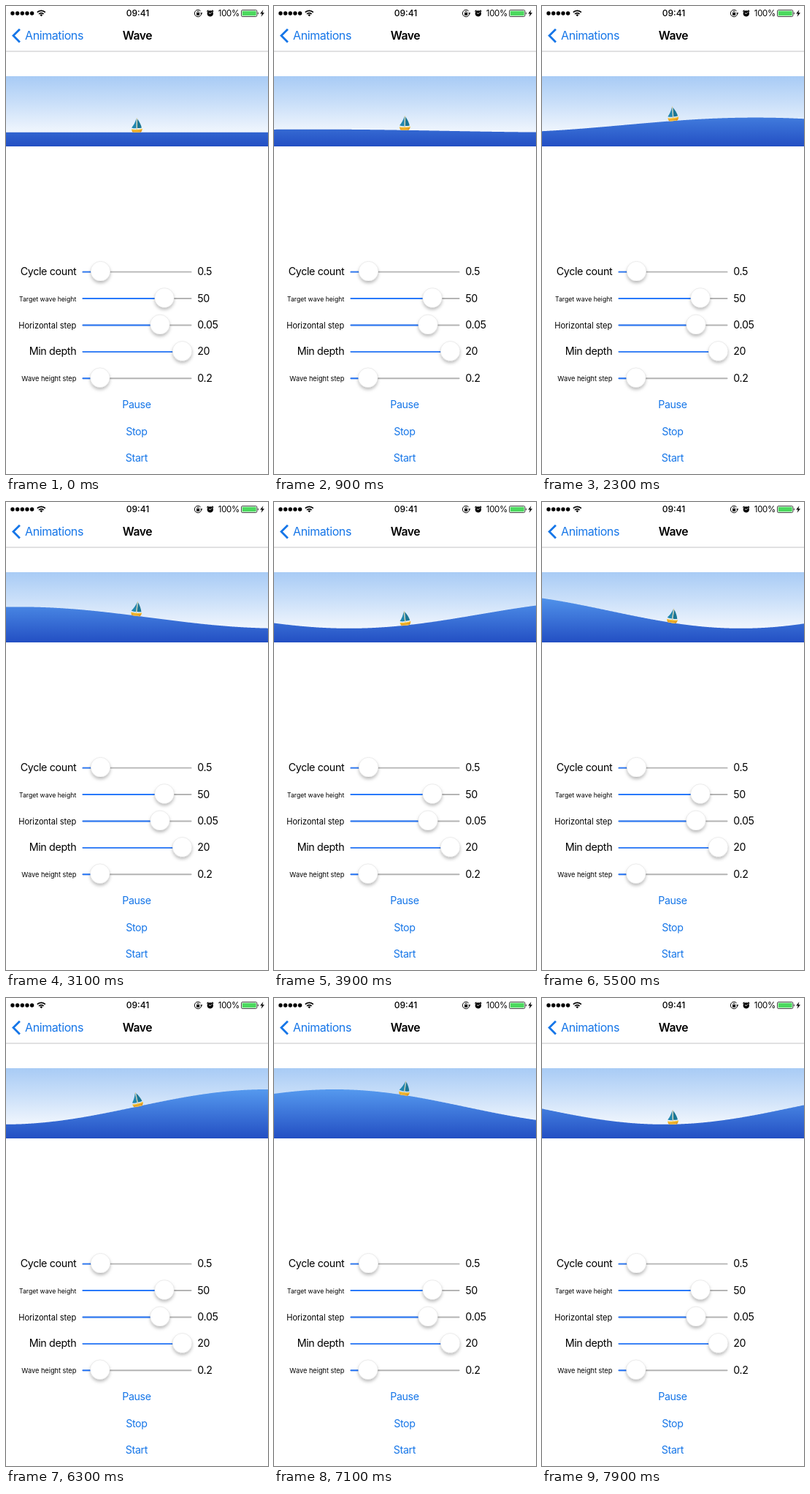
An HTML page with a canvas that plays this animation: 359 px wide and 640 px high, repeating every 8000 ms.

```html
<!DOCTYPE html>
<html lang="en">
<head>
<meta charset="utf-8">
<title>Wave</title>
<style>
  html, body { margin: 0; width: 100%; height: 100%; overflow: hidden; background: #fff; }
  #ui, #sea { position: absolute; left: 0; display: block; }
  #ui { top: 0; }
  #sea { top: 96px; width: 359px; height: 96px; }
  text { font-family: Inter, Roboto, sans-serif; letter-spacing: -0.025em; }
  .end { text-anchor: end; }
  .mid { text-anchor: middle; }
  .body { font-size: 14.2px; }
  .link { fill: #1676e8; }
</style>
</head>
<body>
<svg id="ui" width="359" height="640" viewBox="0 0 359 640">
  <defs>
    <filter id="shade" x="-50%" y="-50%" width="200%" height="200%">
      <feDropShadow dx="0" dy="2.9" stdDeviation="2" flood-color="#000" flood-opacity="0.26"/>
    </filter>
  </defs>

  <!-- status bar -->
  <g id="dots"></g>
  <g fill="none" stroke="#000" stroke-width="1.7">
    <path d="M42.8 8.7A7.6 7.6 0 0 1 53.8 8.7"/>
    <path d="M45 11A4.6 4.6 0 0 1 51.6 11"/>
  </g>
  <path d="M48.3 14.2L46.4 12.3A2.7 2.7 0 0 1 50.2 12.3Z"/>
  <text x="180.5" y="14.2" class="mid" font-size="12" font-weight="500" style="letter-spacing:0">09:41</text>
  <path d="M266.6 6.9A4.7 4.7 0 1 0 267.7 10.8" fill="none" stroke="#000"/>
  <path d="M266 9.3h3.4l-1.7 2.2z"/>
  <rect x="261" y="9.3" width="4.2" height="3.4" rx=".4"/>
  <path d="M261.8 9.6V8.5a1.3 1.3 0 0 1 2.6 0v1.1" fill="none" stroke="#000" stroke-width=".8"/>
  <circle cx="279.8" cy="10.3" r="4.1"/>
  <path d="M275.4 7.5L277.4 5.7M284.2 7.5L282.2 5.7" stroke="#000" stroke-width="1.2"/>
  <path d="M277.9 9.3L279.9 10.7 281.9 8.4" fill="none" stroke="#fff" stroke-width=".9"/>
  <text x="290.8" y="14.2" font-size="11.4">100%</text>
  <rect x="322.5" y="5.5" width="21.4" height="9" rx="1.6" fill="none" stroke="#333" stroke-width=".9"/>
  <rect x="323.7" y="6.7" width="19" height="6.6" rx=".6" fill="#4cd95f"/>
  <path d="M344.9 8.2a2 2 0 0 1 0 3.6z" fill="#333"/>
  <path d="M352.4 5.3L348.2 10.6H350.8L349.6 14.7 354 9.2H351.3Z"/>

  <!-- navigation bar -->
  <path d="M18.9 31.7L10 40.6 18.9 49.5" fill="none" stroke="#1676e8" stroke-width="2.8"/>
  <text x="26" y="46.3" font-size="16" class="link">Animations</text>
  <text x="179.9" y="46.3" class="mid" font-size="15.7" font-weight="600">Wave</text>
  <rect y="61.5" width="359" height="1" fill="#c4c4c6"/>

  <g id="rows"></g>
  <g id="buttons" class="mid body link"></g>
</svg>
<canvas id="sea"></canvas>

<script>
const W = 359, H = 96;
const LOOP = 8000, STEP = 100;
const PT = W / 375;               // pixels per layout point
const START = 0.535;              // seconds until the wave begins
const SPEED = 3, GROWTH = 12;     // rad/s and points/s
const MAX_HEIGHT = 50, MIN_DEPTH = 20, CYCLES = 0.5;

const $ = id => document.getElementById(id);

function buildUi() {
  $('dots').innerHTML = [0, 1, 2, 3, 4]
    .map(i => `<circle cx="${9 + i * 6.65}" cy="10" r="2.7"/>`).join('');

  // label, font size, baseline offset, knob x, value
  const rows = [
    ['Cycle count', 14.3, 4.9, 129.5, '0.5'],
    ['Target wave height', 8.7, 4.4, 217, '50'],
    ['Horizontal step', 11.05, 4.6, 211, '0.05'],
    ['Min depth', 14.3, 4.9, 241.5, '20'],
    ['Wave height step', 9.2, 4.4, 128.8, '0.2'],
  ];
  $('rows').innerHTML = rows.map(([label, size, drop, knob, value], i) => {
    const y = 363.2 + i * 36.4;
    const spacing = size > 12 ? '-0.025em' : '0';
    const track = (width, color) =>
      `<rect x="104.5" y="${y - 0.5}" width="${width}" height="1.9" rx=".95" fill="${color}"/>`;
    return `<text class="end" x="96.3" y="${y + drop}" font-size="${size}" style="letter-spacing:${spacing}">${label}</text>
      ${track(150, '#b4b4b4')}${track(knob - 104.5, '#2979fb')}
      <circle cx="${knob}" cy="${y - 0.5}" r="13.4" fill="#fff" stroke="#000" stroke-opacity=".13" stroke-width=".6" filter="url(#shade)"/>
      <text class="body" x="262.3" y="${y + 4.9}">${value}</text>`;
  }).join('');

  $('buttons').innerHTML = ['Pause', 'Stop', 'Start']
    .map((name, i) => `<text x="178.9" y="${550.2 + i * 36.4}">${name}</text>`).join('');
}

const sea = $('sea');
const scale = window.devicePixelRatio || 1;
sea.width = Math.round(W * scale);
sea.height = Math.round(H * scale);
const ctx = sea.getContext('2d');
ctx.scale(scale, scale);

function gradient(y0, y1, ...colors) {
  const g = ctx.createLinearGradient(0, y0, 0, y1);
  colors.forEach((c, i) => g.addColorStop(i / (colors.length - 1), c));
  return g;
}
const sky = gradient(0, 77, '#a8cbf5', '#cbe0f9', '#f1f6fd');
const water = gradient(29, 96, '#5599ee', '#234fc3');

function shape(fill, path) {
  ctx.fillStyle = fill;
  ctx.fill(new Path2D(path));
}

function drawBoat(y, angle) {
  ctx.save();
  ctx.translate(179.3, y - 9.8);
  ctx.rotate(angle);
  shape('#d9c88c', 'M-.5-9.8H.4V6H-.5Z');
  shape('#2287ae', 'M-.7-9C-2.2-4-4.4.2-7.2 3.4-5 4.2-2.6 4.4-.7 4.2Z');
  shape('#1b7694', 'M.7-8.6C3.4-5 5.6-.8 6.6 3.4 4.6 4 2.4 4.1.7 3.9Z');
  shape('#f6bd2c', 'M-7.4 5.4C-3 6.2 3 6 7.6 4.6 7.4 7 6.4 8.8 4.8 9.8H-5C-6.4 8.8-7.2 7.2-7.4 5.4Z');
  shape('#d88a20', 'M-6.8 7.6C-2 8.3 3 8 7 6.7 6.6 8 5.8 9.2 4.8 9.8H-5C-5.9 9.2-6.4 8.4-6.8 7.6Z');
  shape('#f9d25a', 'M-5.4 8.8H4.8L4.2 9.8H-4.8Z');
  ctx.restore();
}

function draw(ms) {
  const t = Math.max(0, ms / 1000 - START);
  const height = Math.min(MAX_HEIGHT, GROWTH * t) * PT;
  const k = 2 * Math.PI * CYCLES / W;
  const phase = x => SPEED * t + k * x;
  const surface = x => H - MIN_DEPTH * PT - height * (1 + Math.sin(phase(x))) / 2;

  ctx.fillStyle = sky;
  ctx.fillRect(0, 0, W, H);

  ctx.beginPath();
  ctx.moveTo(0, H);
  for (let x = 0; x <= W; x++) ctx.lineTo(x, surface(x));
  ctx.lineTo(W, H);
  ctx.fillStyle = water;
  ctx.fill();

  const slope = -height / 2 * k * Math.cos(phase(W / 2));
  drawBoat(surface(W / 2), Math.atan(slope));
}

function tick() {
  const ms = performance.now() % LOOP;
  draw(Math.floor(ms / STEP) * STEP);
  requestAnimationFrame(tick);
}

buildUi();
tick();
</script>
</body>
</html>
```
